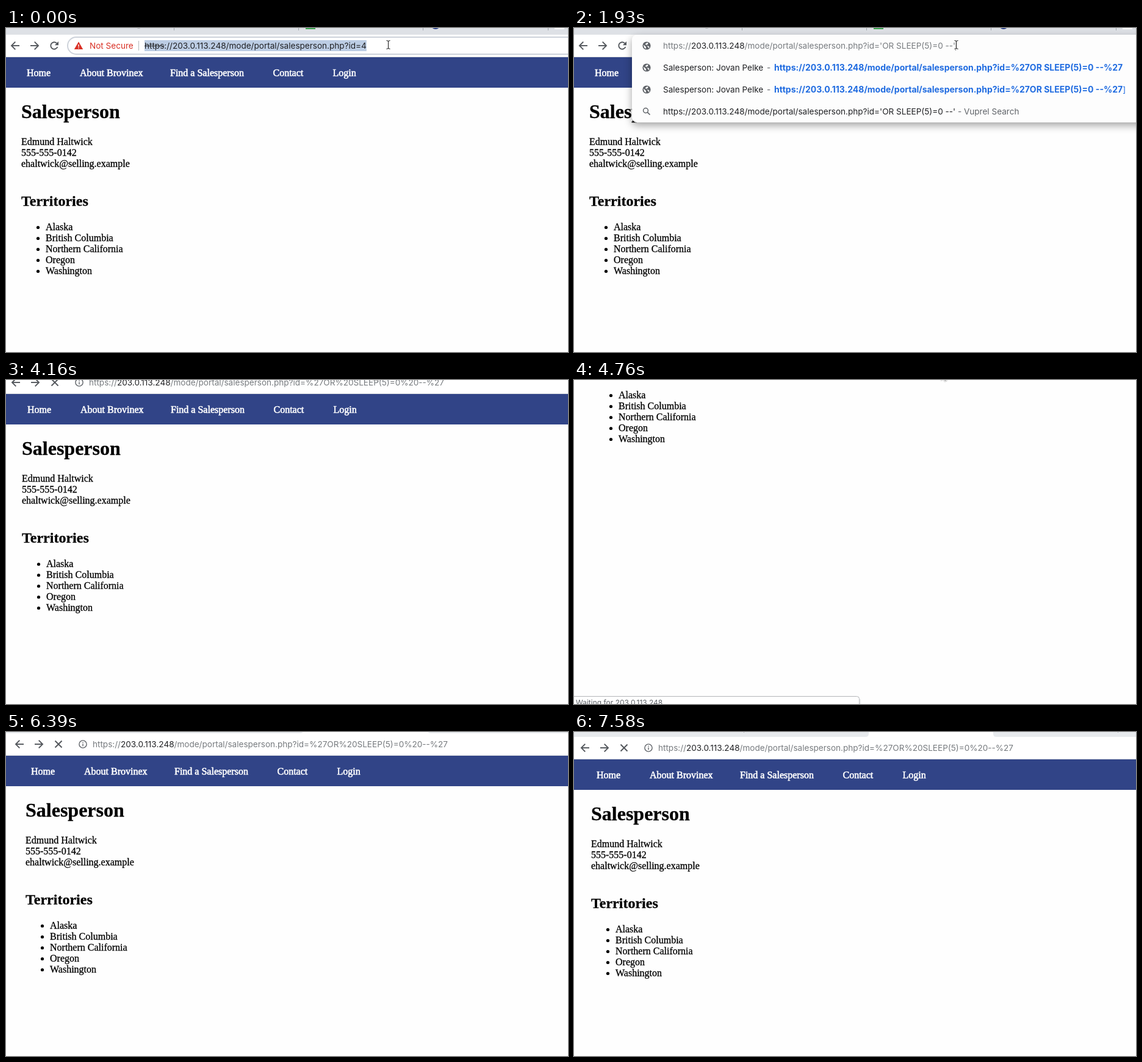
Recreate the animation shown at these times as an HTML page with a canvas. Size 921 by 532 pixels, loop 8000 ms.

```html
<!DOCTYPE html>
<html lang="en">
<head>
<meta charset="utf-8">
<title>Salesperson</title>
<style>
html, body { margin: 0; width: 100%; height: 100%; overflow: hidden; background: #fefefe; }
canvas { display: block; }
</style>
</head>
<body>
<canvas id="stage" width="921" height="532"></canvas>
<script>
const ctx = document.getElementById('stage').getContext('2d');
const W = 921, H = 532, LOOP = 8000, STEP = 148.6;

const UI = 'Inter, sans-serif';
const PLAIN = `400 13.56px ${UI}`, STRONG = `700 14px ${UI}`;
const SERIF = '"Liberation Serif", "Times New Roman", serif';
const INK = '#202124', GREY = '#777b7f', ICON = '#5f6368', RED = '#d93025', BLUE = '#1f6be0';

const SCHEME = 'https://', HOST = '203.0.113.248', PATH = '/mode/portal/salesperson.php?id=';
const BASE = SCHEME + HOST + PATH;
const QUOTED = "'OR SLEEP(5)=0 --'";
const TERRITORIES = ['Alaska', 'British Columbia', 'Northern California', 'Oregon', 'Washington'];

// The window is dragged up, back past its place, then settles: [step, x, y]
const PAN = [
  [27, 0, 0], [28, 1, -25], [30, 5, -175], [32, 8, -302], [34, 8, -313], [35, 7, -313],
  [36, 7, -313], [37, 2, -270], [39, -7, -160], [41, 0, -65], [43, 7, -9], [45, 6, 23],
  [46, 5, 17], [48, 4, -3], [50, 4, -3], [51, 3, -3]
];
const POINTER = [
  [20, 625, 26], [21, 625, 18], [23, 625, 18], [24, 619, 8], [25, 611, -3], [26, 603, -9],
  [27, 603, -9], [28, 602, -15.5], [34, 602, -15.5], [35, 601, -15.5]
];

function sample(keys, n) {
  if (n <= keys[0][0]) return keys[0].slice(1);
  for (let i = 1; i < keys.length; i++) {
    const a = keys[i - 1], b = keys[i];
    if (n <= b[0]) {
      const k = (n - a[0]) / (b[0] - a[0]);
      return [a[1] + (b[1] - a[1]) * k, a[2] + (b[2] - a[2]) * k];
    }
  }
  return keys[keys.length - 1].slice(1);
}

function rect(x, y, w, h, color) {
  ctx.fillStyle = color;
  ctx.fillRect(x, y, w, h);
}

function disc(x, y, r, color) {
  ctx.fillStyle = color;
  ctx.beginPath();
  ctx.arc(x, y, r, 0, 7);
  ctx.fill();
}

function ring(x, y, r, width, color) {
  ctx.strokeStyle = color;
  ctx.lineWidth = width;
  ctx.beginPath();
  ctx.arc(x, y, r, 0, 7);
  ctx.stroke();
}

function trace(points, close) {
  ctx.beginPath();
  points.forEach(([x, y], i) => i ? ctx.lineTo(x, y) : ctx.moveTo(x, y));
  if (close) ctx.closePath();
}

function shape(color, ...points) {
  ctx.fillStyle = color;
  trace(points, true);
  ctx.fill();
}

function line(color, width, ...points) {
  ctx.strokeStyle = color;
  ctx.lineWidth = width;
  trace(points);
  ctx.stroke();
}

function text(str, x, y, font, color) {
  ctx.font = font;
  ctx.fillStyle = color;
  ctx.fillText(str, x, y);
  return x + ctx.measureText(str).width;
}

const ui = (str, x, y, color, font = PLAIN) => text(str, x, y, font, color);

// A thin outline gives the darker text smoothing of the page.
function serif(str, x, y, font = '16px', color = '#000', outline = 0.3) {
  text(str, x, y, `${font} ${SERIF}`, color);
  ctx.strokeStyle = color;
  ctx.lineWidth = outline;
  ctx.strokeText(str, x, y);
}

function address(x, tail) {
  x = ui(SCHEME, x, 34, GREY);
  x = ui(HOST, x, 34, INK);
  return ui(PATH + tail, x, 34, GREY);
}

function caret(x) {
  rect(Math.round(x), 20, 1, 17, '#6b6f73');
}

function drawPage() {
  rect(-20, 48, W + 40, 50, '#314487');
  [['Home', 34], ['About Brovinex', 121], ['Find a Salesperson', 269], ['Contact', 437.5], ['Login', 535.5]]
    .forEach(([label, x]) => serif(label, x, 79, '16px', '#fff', 0.6));
  serif('Salesperson', 25, 148, 'bold 32px');
  serif('Edmund Haltwick', 25, 192);
  serif('555-555-0142', 25, 210);
  serif('ehaltwick@selling.example', 25, 228);
  serif('Territories', 25, 292, 'bold 24px');
  TERRITORIES.forEach((name, i) => {
    disc(52.5, 327.5 + i * 18, 2.6, '#000');
    serif(name, 65, 332 + i * 18);
  });
}

function drawTabs(n) {
  rect(-20, -40, W + 40, 51, n > 31 ? '#e7eaed' : '#dee1e6');
  const hover = Math.min(1, Math.max(0, (n - 23) / 3));
  if (hover) {
    ctx.globalAlpha = hover;
    ctx.fillStyle = '#fff';
    ctx.beginPath();
    ctx.moveTo(475, 11);
    ctx.quadraticCurveTo(480, 11, 480, 6);
    ctx.arcTo(480, -23, 490, -23, 8);
    ctx.arcTo(684, -23, 684, -10, 8);
    ctx.lineTo(684, 6);
    ctx.quadraticCurveTo(684, 11, 689, 11);
    ctx.fill();
    ctx.globalAlpha = 1;
  }
  (hover ? [275, 888] : [275, 479, 683, 888]).forEach(x => rect(x, -16, 1, 20, '#a3a8ae'));
  rect(491, -14, 16, 16, '#3fa452');
  disc(704, -6, 8, '#2f468c');
  rect(899, -14, 16, 16, '#fff');
  ring(217.5, -5, 5, 1.5, '#a0a4a9');
}

function drawButtons(loading) {
  const c = '#54585d';
  line(c, 1.9, [22, 29], [9, 29]);
  line(c, 1.9, [15.3, 22.7], [9, 29], [15.3, 35.3]);
  line(c, 1.9, [40, 29], [53, 29]);
  line(c, 1.9, [46.7, 22.7], [53, 29], [46.7, 35.3]);
  if (loading) {
    line(c, 1.9, [73.5, 23.5], [84.5, 34.5]);
    line(c, 1.9, [84.5, 23.5], [73.5, 34.5]);
    return;
  }
  ctx.beginPath();
  ctx.arc(79, 29, 5.7, 0.35, 5.5);
  ctx.stroke();
  shape(c, [86, 22], [86, 28.2], [79.8, 28.2]);
}

function globe(y) {
  disc(119, y, 6.6, ICON);
  shape('#fff', [113.8, y - 1.5], [117.5, y + 1.6], [118.3, y + 5.3], [115.2, y + 3.6]);
  shape('#fff', [116.5, y - 2.5], [119.5, y - 4.8], [121.5, y - 4.8], [121, y - 2.6], [118.6, y - 1]);
  shape('#fff', [119, y + 0.4], [122, y + 0.6], [123.8, y + 2.8], [122, y + 4], [121.2, y + 2]);
}

function lens(y) {
  ring(117.5, y - 1.5, 3.9, 1.5, ICON);
  line(ICON, 1.7, [120.3, y + 1.3], [124.5, y + 5.5]);
}

function warning() {
  shape(RED, [119, 22.5], [126.2, 35], [111.8, 35]);
  rect(118.3, 27, 1.4, 4, '#fff');
  rect(118.3, 32, 1.4, 1.5, '#fff');
}

function info() {
  ring(119, 29, 6.1, 1.4, ICON);
  rect(118.3, 28.3, 1.4, 4, ICON);
  rect(118.3, 25.6, 1.4, 1.5, ICON);
}

// rows: [label, x of link, matched part, rest]
function popup(rows, query) {
  const bottom = 83 + rows.length * 36;
  ctx.save();
  ctx.shadowColor = 'rgba(0,0,0,.36)';
  ctx.shadowBlur = 13;
  ctx.shadowOffsetY = 5;
  ctx.fillStyle = '#fdfdfd';
  ctx.beginPath();
  ctx.roundRect(95, 11, W, bottom - 11, 8);
  ctx.fill();
  ctx.restore();

  rows.forEach(([label, x, match, rest], i) => {
    const y = 65 + i * 36;
    globe(y);
    if (label) {
      ui(label, 146, y + 5, INK);
      ui('-', x - 12, y + 5, ICON);
    }
    ui(rest, ui(match, x, y + 5, BLUE, STRONG), y + 5, BLUE);
  });
  const y = bottom - 18;
  lens(y);
  const end = ui(BASE + query, 146, y + 5, INK);
  ui(' - Vuprel Search', end, y + 5, ICON);
}

const FIRST = [
  ['Find a Salesperson', 284, BASE, ''],
  ['Salesperson: Lem Varkis', 319, BASE, '5'],
  ['', 146, BASE, '%27 OR SLEEP(5)=0--’'],
  ['Salesperson: Miranda Tolbrick', 358, BASE, '9']
];
const SECOND = ['', ']'].map(rest =>
  ['Salesperson: Jovan Pelke', 328, BASE + '%27OR SLEEP(5)=0 --%27', rest]);

function drawSelectedBar(n) {
  ctx.strokeStyle = '#cdd2da';
  ctx.lineWidth = 2;
  ctx.beginPath();
  ctx.roundRect(101, 15, W, 28, 14);
  ctx.stroke();
  warning();
  ui('Not Secure', 137, 34, RED);
  rect(217, 21, 1, 16, '#b4b7bb');
  const marked = n < 1;
  const full = BASE + '4';
  ctx.font = PLAIN;
  const width = ctx.measureText(full).width;
  if (marked) rect(227, 20, width, 18, '#bccde4');
  const strike = marked ? INK : RED, dim = marked ? INK : GREY;
  let x = ui('https', 227, 34, strike);
  rect(227, 29, x - 227, 1, strike);
  x = ui('://', x, 34, dim);
  x = ui(HOST, x, 34, INK);
  ui(PATH + '4', x, 34, dim);
  if (n >= 1 && n < 5) caret(227 + width);
}

function drawBar(n) {
  if (n < 8) return drawSelectedBar(n);
  if (n < 20) {
    const first = n < 13;
    popup(first ? FIRST : SECOND, first ? '' : QUOTED);
    globe(29);
    const end = address(146, first ? '' : QUOTED);
    if (n < 11 || (n >= 13 && n < 17)) caret(end);
    return;
  }
  if (n === 20) {
    ctx.globalAlpha = 0.13;
    popup(SECOND, QUOTED);
    ctx.globalAlpha = 1;
  }
  info();
  address(135, '%27OR%20SLEEP(5)=0%20--%27');
}

function drawStatus() {
  ctx.fillStyle = '#fff';
  ctx.strokeStyle = '#b3b5b8';
  ctx.lineWidth = 1;
  ctx.beginPath();
  ctx.roundRect(-40, 821.5, 499.5, 24, 4);
  ctx.fill();
  ctx.stroke();
  rect(460.5, 826, 1.5, 20, '#e6e7e8');
  text(`Waiting for ${HOST}...`, -5, 836, `12px ${UI}`, ICON);
}

function drawBeam() {
  const parts = [[[623.5, 20.5], [626.5, 21.5], [629.5, 20.5]],
    [[626.5, 21.5], [626.5, 33.5]],
    [[623.5, 34.5], [626.5, 33.5], [629.5, 34.5]]];
  parts.forEach(p => line('rgba(255,255,255,.8)', 3, ...p));
  parts.forEach(p => line('#222', 1.1, ...p));
}

function drawArrow(x, y) {
  ctx.save();
  ctx.translate(x, y);
  trace([[0.5, 0], [0.5, 14], [3.6, 11.2], [5.8, 16.3], [8.2, 15.3], [6, 10.3], [10.4, 10.3]], true);
  ctx.shadowColor = 'rgba(0,0,0,.35)';
  ctx.shadowBlur = 2;
  ctx.shadowOffsetY = 1;
  ctx.strokeStyle = '#fff';
  ctx.lineWidth = 2;
  ctx.stroke();
  ctx.shadowColor = 'transparent';
  ctx.fillStyle = '#111';
  ctx.fill();
  ctx.restore();
}

function draw(t) {
  const n = Math.floor((t + 9) / STEP);
  const [px, py] = sample(PAN, n).map(Math.round);
  rect(0, 0, W, H, '#fefefe');
  ctx.save();
  ctx.translate(px, py);
  drawPage();
  drawTabs(n);
  rect(-20, 11, W + 40, 36, '#fff');
  rect(-20, 47, W + 40, 1, '#d9dbe0');
  drawButtons(n >= 20);
  drawBar(n);
  if (n >= 21) drawStatus();
  ctx.restore();
  if (n < 20) drawBeam();
  else if (n < 37) drawArrow(...sample(POINTER, n));
}

ctx.lineJoin = 'miter';
ctx.miterLimit = 3;
const start = performance.now();
function tick() {
  draw((performance.now() - start) % LOOP);
  requestAnimationFrame(tick);
}
tick();
</script>
</body>
</html>
```
